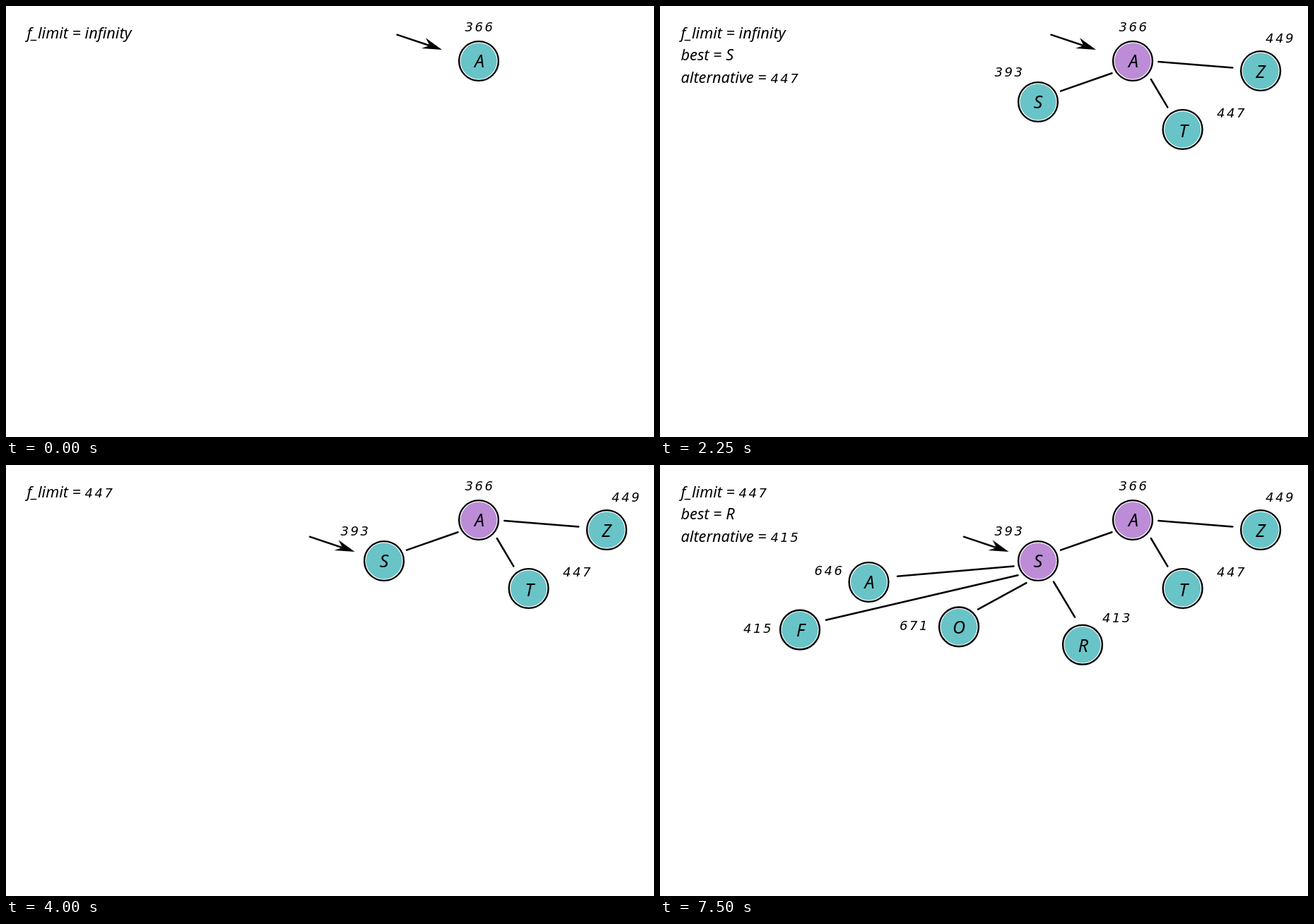
An HTML page that plays this animation: 917 by 611 pixels, repeating every 8000 ms.

```html
<!DOCTYPE html>
<html lang="en">
<head>
<meta charset="utf-8">
<title>Best-first search steps</title>
<style>
  html, body { margin: 0; width: 100%; height: 100%; overflow: hidden; background: #fff; }
  svg { display: block; width: 100%; height: 100%; }

  text { font: italic 21.7px "Noto Sans", "Open Sans", sans-serif; fill: #000; }
  .num { font: italic 18px "DejaVu Sans", sans-serif; letter-spacing: 2.5px; }
  .costs text { text-anchor: middle; }
  .node { fill: #69c4c8; }
  .node text { font-size: 25px; text-anchor: middle; }
  .edges { stroke: #000; stroke-width: 2.5; stroke-linecap: round; fill: none; }

  .start, .limit, .first, .second, .children, .grandchildren, .root, .next, .arrow {
    animation: 8s step-end infinite;
  }
  .children { animation-name: from-500; }
  .first { animation-name: from-2250-to-4000; }
  .start { animation-name: until-4000; }
  .limit { animation-name: from-4000; }
  .grandchildren { animation-name: from-5750; }
  .second { animation-name: from-7500; }
  .root { animation-name: expand-root; }
  .next { animation-name: expand-next; }
  .arrow { animation-name: advance; }

  @keyframes from-500 { 0% { visibility: hidden } 6.25%, 100% { visibility: visible } }
  @keyframes from-2250-to-4000 {
    0% { visibility: hidden } 28.125% { visibility: visible } 50%, 100% { visibility: hidden }
  }
  @keyframes until-4000 { 0% { visibility: visible } 50%, 100% { visibility: hidden } }
  @keyframes from-4000 { 0% { visibility: hidden } 50%, 100% { visibility: visible } }
  @keyframes from-5750 { 0% { visibility: hidden } 71.875%, 100% { visibility: visible } }
  @keyframes from-7500 { 0% { visibility: hidden } 93.75%, 100% { visibility: visible } }
  @keyframes expand-root { 0% { fill: #69c4c8 } 6.25%, 100% { fill: #bd8cd7 } }
  @keyframes expand-next { 0% { fill: #69c4c8 } 71.875%, 100% { fill: #bd8cd7 } }
  @keyframes advance { 0% { transform: none } 50%, 100% { transform: translate(-123.5px, 61px) } }
</style>
</head>
<body>
<svg viewBox="0 0 917 611">
  <defs>
    <g id="disc">
      <circle r="27.9" style="fill:#fff" stroke="#000" stroke-width="2.4"/>
      <circle r="25.6"/>
    </g>
  </defs>

  <text class="start" x="29.5" y="45.5">f_limit = infinity</text>
  <text class="limit" x="29.5" y="45.5">f_limit = <tspan class="num">447</tspan></text>
  <g class="first">
    <text x="29.5" y="77">best = S</text>
    <text x="29.5" y="109">alternative = <tspan class="num">447</tspan></text>
  </g>
  <g class="second">
    <text x="29.5" y="77">best = R</text>
    <text x="29.5" y="109">alternative = <tspan class="num">415</tspan></text>
  </g>

  <g class="arrow">
    <path d="M552.5 40.4L602 57" stroke="#000" stroke-width="2.5"/>
    <path d="M617 62L594 45.2L599.5 56L588 60Z"/>
  </g>

  <g class="node root" transform="translate(669 78)"><use href="#disc"/><text x="1" y="9">A</text></g>
  <g class="costs"><text class="num" x="670.5" y="36">366</text></g>

  <g class="children">
    <path class="edges" d="M567 120.6L639.5 95.2M694.8 104L718.3 143.6M705.3 79L810.3 87.4"/>
    <g class="node next" transform="translate(535 136)"><use href="#disc"/><text y="9.3">S</text></g>
    <g class="node" transform="translate(739.6 175)"><use href="#disc"/><text x="1" y="10.7">T</text></g>
    <g class="node" transform="translate(850 92)"><use href="#disc"/><text y="10">Z</text></g>
    <g class="costs">
      <text class="num" x="494.5" y="100">393</text>
      <text class="num" x="809" y="158">447</text>
      <text class="num" x="878" y="52">449</text>
    </g>
  </g>

  <g class="grandchildren">
    <path class="edges" d="M336 157.8L500.5 143.6M235 219.8L506.5 156.2M450 204.7L518.5 167.2M557 165.5L587 215.7"/>
    <g class="node" transform="translate(295.5 166)"><use href="#disc"/><text x="1" y="9">A</text></g>
    <g class="node" transform="translate(198 233.6)"><use href="#disc"/><text x="1" y="9.7">F</text></g>
    <g class="node" transform="translate(423 229.4)"><use href="#disc"/><text y="9.3">O</text></g>
    <g class="node" transform="translate(598 254.8)"><use href="#disc"/><text x="1" y="10">R</text></g>
    <g class="costs">
      <text class="num" x="239.5" y="156">646</text>
      <text class="num" x="139" y="238">415</text>
      <text class="num" x="360" y="234">671</text>
      <text class="num" x="647" y="223">413</text>
    </g>
  </g>
</svg>
</body>
</html>
```
